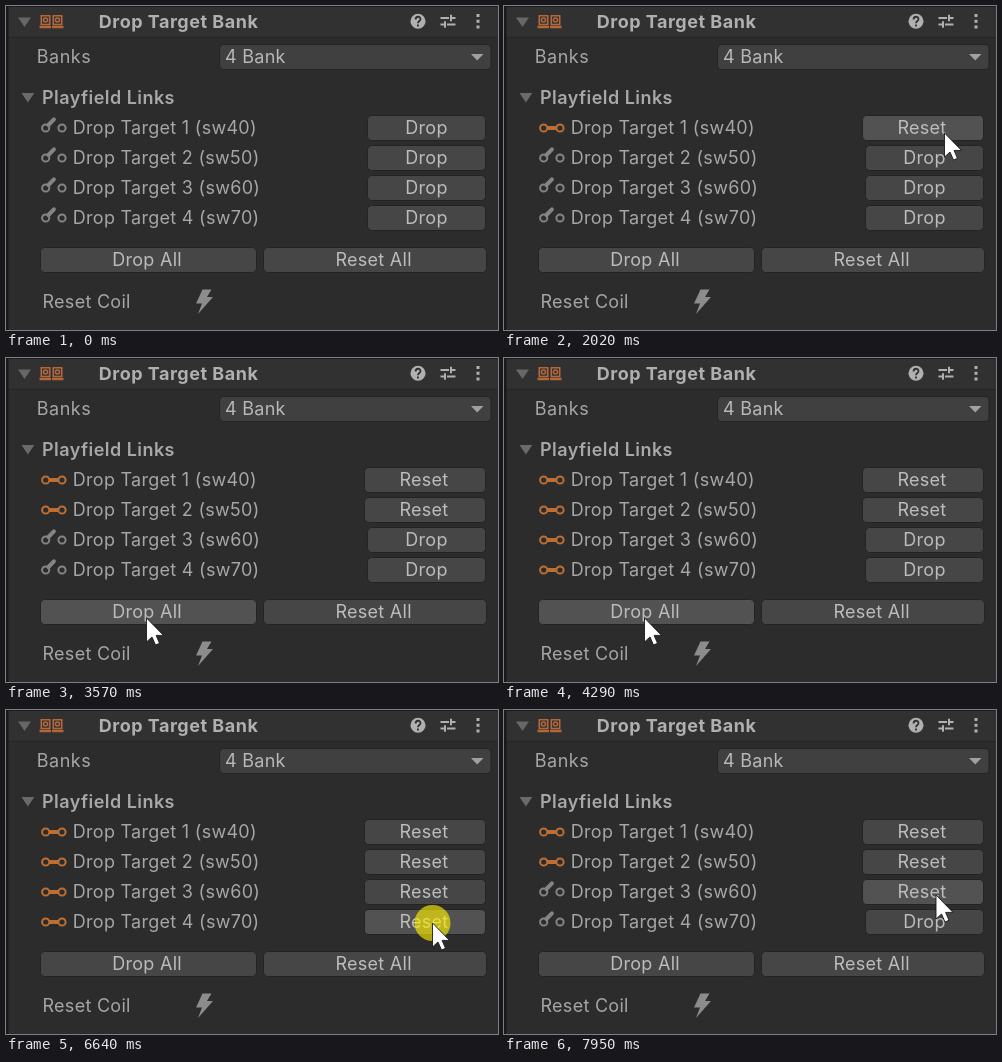
Animation, 492 px wide and 324 px high, one loop 8000 ms. Source, as an HTML page:

```html
<!DOCTYPE html>
<html lang="en">
<head>
<meta charset="utf-8">
<title>Drop Target Bank</title>
<style>
  html, body { margin: 0; width: 100%; height: 100%; overflow: hidden; background: #2c2c2c; }
  svg { display: block; width: 492px; height: 324px; }
  text {
    font: 18px Inter, "Open Sans", sans-serif;
    font-optical-sizing: none;
    letter-spacing: .28px;
    fill: #a6a6a6;
    white-space: pre;
  }
  .bold { font-weight: 600; letter-spacing: .45px; fill: #a8a8a8; }
  .title { font-weight: 700; letter-spacing: .5px; fill: #b0b0b0; }
  .button rect { fill: #464646; stroke: #232323; }
  .button.hover rect { fill: #525252; }
  .button text { fill: #bcbcbc; text-anchor: middle; }
  .open { stroke: #848484; }
  .closed { stroke: #bd6e33; }
  .open, .closed { fill: none; stroke-width: 2; }
</style>
</head>
<body>
<svg viewBox="0 0 492 324">
  <rect width="492" height="324" fill="#2c2c2c"/>
  <rect width="492" height="31" fill="#313131"/>
  <path d="M0 .5H492" stroke="#1c1c1c"/>
  <path d="M0 31.5H492" stroke="#252525"/>
  <rect width="2.5" height="324" fill="#191919"/>

  <path d="M12 11.5H25L18.5 21Z" fill="#666"/>
  <g fill="none" stroke="#b4683a" stroke-width="1.6">
    <path d="M35.3 9.8H43.7V18.5H35.3ZM47.3 9.8H55.7V18.5H47.3Z"/>
    <circle cx="39.5" cy="14" r="2"/>
    <circle cx="51.5" cy="14" r="2"/>
    <path d="M33.5 21H45M46 21H57.5" stroke-width="2.4"/>
  </g>
  <text class="title" x="92.8" y="22">Drop Target Bank</text>

  <circle cx="412" cy="15.2" r="7.5" fill="#b0b0b0"/>
  <path d="M409.6 13.4C409.6 9.8 414.6 10 414.5 13.2C414.4 15 412 15 412 17.2M412 18.6V20.4" fill="none" stroke="#303030" stroke-width="1.8"/>
  <path d="M434.5 12H443M446 12H449.5M434.5 18.5H438M441 18.5H449.5M445 8.8V15.2M439 15.3V21.7" stroke="#b0b0b0" stroke-width="2"/>
  <path d="M470.5 8h3v3h-3zM470.5 13.7h3v3h-3zM470.5 19.4h3v3h-3z" fill="#b0b0b0"/>

  <text x="30.8" y="57" style="letter-spacing:.5px">Banks</text>
  <rect x="213.5" y="38.5" width="271.5" height="25" rx="4" fill="#404040" stroke="#232323"/>
  <text x="219" y="57" style="fill:#b8b8b8">4 Bank</text>
  <path d="M465 48H477.5L471.2 54.5Z" fill="#a0a0a0"/>

  <rect id="band" x="12" y="79" width="478" height="26" fill="#353535"/>
  <path d="M15.5 87H28.3L21.9 96.5Z" fill="#6a6a6a"/>
  <text class="bold" x="36" y="98">Playfield Links</text>

  <g id="panel"></g>

  <text x="36.5" y="302">Reset Coil</text>
  <path d="M196.5 283.5H205.5L201 291H207L192 308L196 297.5H190Z" fill="#8c8c8c"/>

  <circle id="press" r="18" fill="#fff000" fill-opacity=".63"/>
  <path id="cursor" d="M0 0V24L5.5 19L9 27L13 25.3L9.6 17.4H17Z" fill="#fff" stroke="#1a1a1a" stroke-width=".9"/>
</svg>
<script>
const LOOP = 8000;
const $ = id => document.getElementById(id);
const panel = $('panel');

// time, x, y of the pointer tip
const path = [
  [610, 491, 73], [890, 450, 95], [1200, 442, 118], [1410, 440.5, 125.5],
  [1980, 440.5, 125.5], [2260, 440.5, 152], [3060, 440.5, 152], [3570, 140.5, 260],
  [5030, 140.5, 260], [5280, 320.5, 200], [5450, 388, 194], [5860, 426.5, 212],
  [5940, 426.5, 213], [6850, 426.5, 213], [7250, 432, 185], [LOOP, 432, 185]
];
const clicks = [1480, 2700, 4150, 6640, 7780];

// spans during which the switch is closed and the button reads "Reset"
const targets = [
  { closed: [1610, LOOP], reset: [1650, LOOP] },
  { closed: [2850, LOOP], reset: [2940, LOOP] },
  { closed: [4290, 7940], reset: [4490, LOOP] },
  { closed: [4290, 6780], reset: [4490, 6840] }
];

function add(parent, tag, attrs, label = '') {
  const el = document.createElementNS('http://www.w3.org/2000/svg', tag);
  for (const key in attrs) el.setAttribute(key, attrs[key]);
  el.textContent = label;
  return parent.appendChild(el);
}

function addButton(left, right, y, label, center) {
  const el = add(panel, 'g', { class: 'button' });
  add(el, 'rect', { x: left + .5, y: y - 12.5, width: right - left - 1, height: 25, rx: 4 });
  add(el, 'text', { x: center, y: y + 6 }, label);
  return { el, left, right, y };
}

function addSwitch(kind, y) {
  const el = add(panel, 'g', { class: kind, transform: `translate(0 ${y})` });
  add(el, 'circle', { cx: 39.7, cy: 0, r: 3.6 });
  add(el, 'circle', { cx: 56, cy: 0, r: 3.6 });
  add(el, 'path', kind === 'open'
    ? { d: 'M42.4 -3L47.9 -8.7', 'stroke-width': 4, 'stroke-linecap': 'round' }
    : { d: 'M43 0H53', 'stroke-width': 4 });
  return el;
}

targets.forEach((target, i) => {
  const y = 122 + 30 * i;
  target.openIcon = addSwitch('open', y);
  target.closedIcon = addSwitch('closed', y);
  add(panel, 'text', { x: 66.8, y: y + 6 }, `Drop Target ${i + 1} (sw${i + 4}0)`);
  target.dropButton = addButton(361, 480, y, 'Drop', 420.5);
  target.resetButton = addButton(358, 480, y, 'Reset', 418);
});
const buttons = [
  ...targets.flatMap(t => [t.dropButton, t.resetButton]),
  addButton(34, 251, 254, 'Drop All', 141.1),
  addButton(257, 481, 254, 'Reset All', 367.6)
];

// Slope at a key; zero next to a rest so that stops are smooth.
function slope(i, axis) {
  const a = path[i - 1] || path[i], k = path[i], b = path[i + 1] || k;
  if ((a !== k && a[axis] === k[axis]) || b[axis] === k[axis]) return 0;
  return (b[axis] - a[axis]) / (b[0] - a[0]);
}

function pointer(t) {
  let i = 0;
  while (i < path.length - 2 && t >= path[i + 1][0]) i++;
  const a = path[i], b = path[i + 1], span = b[0] - a[0];
  const u = Math.max(0, (t - a[0]) / span), v = 1 - u;
  return [1, 2].map(axis =>
    v * v * (1 + 2 * u) * a[axis] + u * u * (3 - 2 * u) * b[axis] +
    span * u * v * (v * slope(i, axis) - u * slope(i + 1, axis)));
}

const within = (t, [from, to]) => t >= from && t < to;
const show = (el, on) => el.style.display = on ? '' : 'none';

function draw(t) {
  const [x, y] = pointer(t), active = t >= path[0][0];
  const move = `translate(${x} ${y})`;
  $('cursor').setAttribute('transform', move);
  $('press').setAttribute('transform', move);
  show($('cursor'), active);
  show($('band'), active && y >= 79 && y < 105);

  const since = Math.min(...clicks.filter(c => c <= t).map(c => t - c));
  $('press').style.opacity = Math.max(0, Math.min(1, (135 - since) / 30));

  for (const target of targets) {
    const closed = within(t, target.closed), reset = within(t, target.reset);
    show(target.openIcon, !closed);
    show(target.closedIcon, closed);
    show(target.dropButton.el, !reset);
    show(target.resetButton.el, reset);
  }
  for (const b of buttons) {
    const over = active && x >= b.left && x < b.right && Math.abs(y - b.y) < 12.5;
    b.el.classList.toggle('hover', over);
  }
}

function tick(now) {
  draw(now % LOOP);
  requestAnimationFrame(tick);
}
draw(0);
requestAnimationFrame(tick);
</script>
</body>
</html>
```
